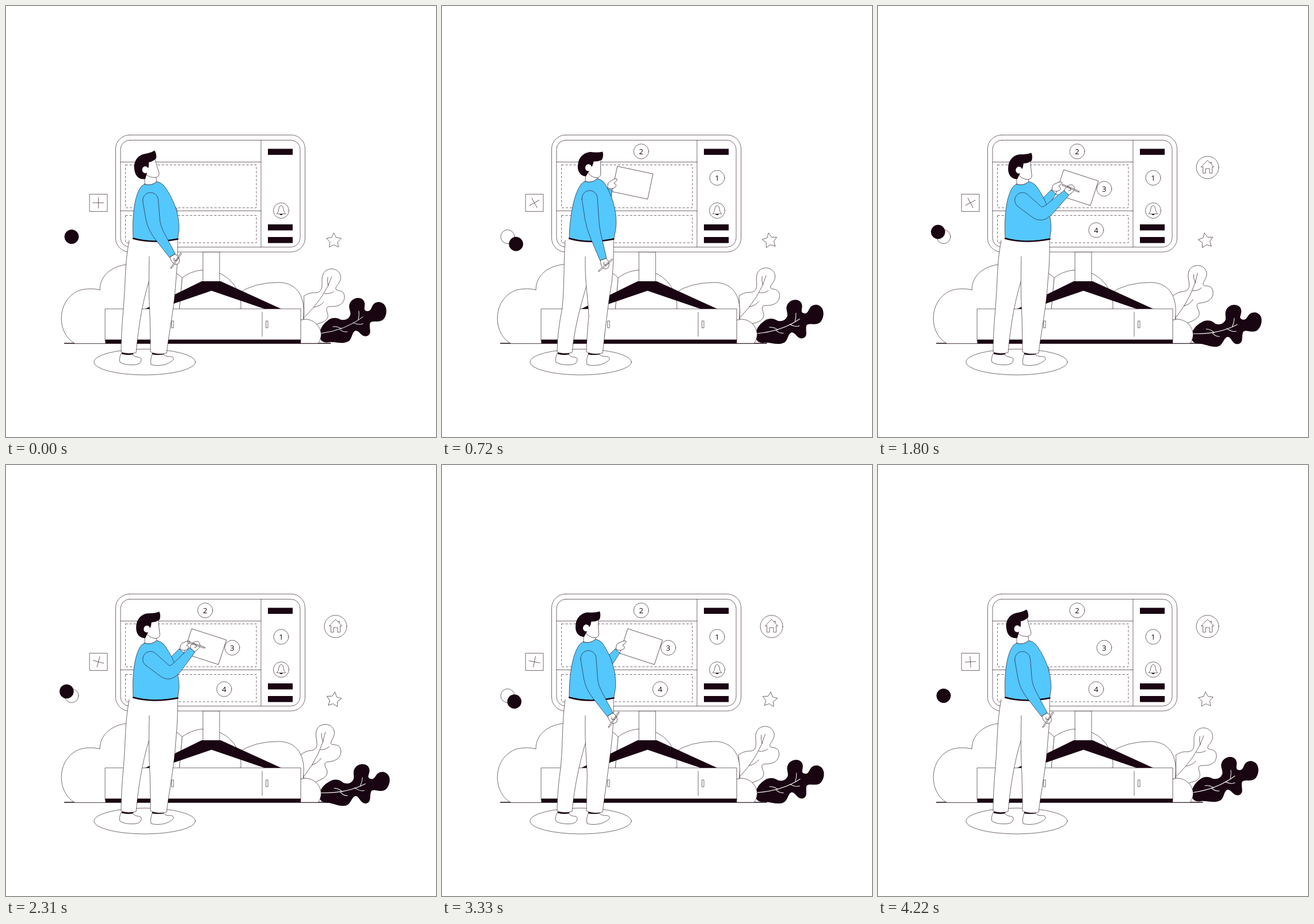
These frames come from a looping animation (747 by 750 pixels, 4260 ms). An HTML page:

```html
<!DOCTYPE html>
<html lang="en">
<head>
<meta charset="utf-8">
<title>Planning board</title>
<style>
  html, body { margin: 0; width: 100%; height: 100%; overflow: hidden; background: #fff }
  svg { display: block; width: 747px; height: 750px }
  svg { fill: #fff; stroke: #190411; stroke-width: .6; stroke-linejoin: round; stroke-linecap: round }
  .ink { fill: #190411; stroke: none }
  .blue { fill: #54c7fc }
  .line { fill: none }
  .dash { fill: none; stroke-dasharray: 4 3; stroke-linecap: butt }
  text { font: 13px "Open Sans", "Noto Sans", sans-serif; text-anchor: middle; fill: #190411; stroke: none }
</style>
</head>
<body>
<svg viewBox="0 0 747 750">
  <!-- plants -->
  <g id="paleLeaf">
    <path d="M518 504Q528 498 537 499C549 499 549 490 549 481C548 466 554 457 567 457.500C580 459 584 471 580 479C577 486 570 490 574 494C580 496 588 495 588 507C587 520 576 523 566 523C556 522 556 526 558 533C562 543 556 549 545 552L518 560Z"/>
    <path class="line" d="M519 541Q553 508 566 471M560 487Q557 480 559 472M553 500Q562 502 569 497M535 524Q545 523 552 515"/>
  </g>
  <path d="M101.500 587H564" stroke-width="1.300"/>
  <g id="darkLeaf">
    <path class="ink" d="M545 572C545 560 552 552 562 545Q572 540 582 546Q594 548 598 538C600 532 594 526 597 518C602 506 618 505 622 514C626 522 618 530 628 531C638 531 632 516 648 515C664 517 663 537 656 545C648 553 634 545 632 553C631 562 636 570 628 574C618 578 614 564 607 565C600 568 602 580 594 584C584 589 572 584 562 585C554 586 545 586 545 572Z"/>
    <path class="line" stroke="#fff" stroke-width="1" d="M546 570Q590 564 620 541M612 546Q614 538 613 531M603 551Q613 556 620 553M583 562Q577 557 568 558M580 563Q586 568 593 567"/>
  </g>
  <path d="M512 546C532 541 547 556 547.500 572Q547 581 542 587H512Z"/>
  <path d="M404 500Q430 481 475 481C505 482 522 505 516 546L404 550Z"/>
  <path d="M306 473A63 63 0 0 1 408 527L300 540Z"/>
  <path d="M163 494C163 460 200 443 240 451Q290 455 306 473L300 540H163Z"/>
  <path d="M119 587C86 568 88 508 130 494Q148 490 163 494L180 500V587Z" stroke="none"/>
  <path class="line" d="M119 587C86 568 88 508 130 494Q148 490 163 494"/>

  <!-- cabinet and stand -->
  <rect x="172.500" y="527" width="339.500" height="56"/>
  <path class="ink" d="M172.500 580.500H512V587H172.500Z"/>
  <path class="line" d="M282.500 533V575M445 533V575"/>
  <path d="M288 548h3v12h-3zM452 548h3v12h-3z"/>
  <path d="M342.500 428H371V480H342.500Z"/>
  <path class="ink" d="M340 479H373L478 527H449L357 495.500L265 527H242Z"/>

  <!-- screen -->
  <rect x="190.500" y="224.500" width="329" height="203.500" rx="24"/>
  <rect x="199" y="233.500" width="312" height="186" rx="16"/>
  <path class="line" d="M443 233.500V419.500M199 271.500H443M199 356.500H443"/>
  <path class="dash" d="M207.500 276.500H435V351H207.500ZM207.500 364.500H435V412H207.500Z"/>
  <path class="ink" d="M455 248.500h43v10.500h-43zM455 380h43v10.500h-43zM455 402h43v10.500h-43z"/>
  <circle cx="478" cy="356" r="13.500"/>
  <path d="M470.500 361.500Q474 358 474 353Q474 348 478 347Q482 348 482 353Q482 358 485.500 361.500Z"/>
  <path class="ink" d="M475 362h6q-3 4-6 0"/>

  <!-- badges, in order of appearance -->
  <g class="pop" data-x="478" data-y="299"><circle r="13"/><text y="4.700">1</text></g>
  <g class="pop" data-x="346" data-y="253"><circle r="13"/><text y="4.700">2</text></g>
  <g class="pop" data-x="393" data-y="318"><circle r="13"/><text y="4.700">3</text></g>
  <g class="pop" data-x="572.500" data-y="281">
    <circle r="19.500"/>
    <path d="M-8 -1V10H-3.500V2H3.500V10H8V-1H11L7 -5V-9H5V-7L0 -12.500L-11 -1Z"/>
  </g>
  <g class="pop" data-x="379" data-y="390"><circle r="13"/><text y="4.700">4</text></g>

  <!-- ornaments -->
  <rect x="145.500" y="327.500" width="30.500" height="30"/>
  <path id="plus" class="line" d="M-9.500 0H9.500M0 -9.500V9.500"/>
  <circle cx="114" cy="401.500" r="12"/>
  <circle id="dot" class="ink" r="12.300"/>
  <path id="star"/>

  <!-- person -->
  <ellipse cx="241" cy="619.500" rx="88" ry="22.500"/>
  <g id="paper">
    <rect width="63" height="45"/>
    <path d="M-9 40Q-12 31 -6 27Q1 20 4 22Q4 26 0 30Q6 31 4 36Q-1 42 -9 40Z"/>
  </g>
  <path id="backArm" class="blue"/>
  <path d="M200 605Q196 613 198 620Q206 625 222 624.500Q236 624 235 614Q234 611 229 611Q223 611 219 605Z"/>
  <path d="M254 606Q250 616 252 624Q262 627 276 624Q292 618 291 613Q289 609 283 610Q277 610 273 606Z"/>
  <path class="line" stroke-width="2.500" d="M202 604.500Q211 607 220 605M255 605Q264 607 273 605"/>
  <path stroke="none" d="M214 408H298L294 480L252 505L211 470Z"/>
  <path id="legL"/>
  <path id="legR"/>
  <g id="torso">
    <path d="M241 294V310Q252 314 262 306L260 294"/>
    <path class="blue" d="M241 310Q252 314 262 305.500Q269 307 274 312C290 333 302 362 300.500 390L298.500 405Q255 414 221 404C219 372 222 330 235 314Q238 311 241 310Z"/>
    <path class="line" stroke-width="2.400" d="M221 404.500Q255 414 298.500 405.500"/>
  </g>
  <g id="head">
    <path d="M244 272L259 266Q262 279 266 291Q266 298 258 298.500Q250 299 244 294Z"/>
    <path class="ink" d="M258 251.500Q251 256 238 258C226 262 221 274 223 284C224 296 232 303 242 301L245 290L248 279L248 272Q255 271 261 265Q262 257 258 251.500Z"/>
    <ellipse cx="242" cy="285" rx="5.500" ry="6" stroke="none"/>
  </g>
  <path id="arm" class="blue"/>
  <g id="hand">
    <path d="M0 -5Q5 -9 11 -7Q18 -4 17 0Q16 6 10 6.500Q4 7 0 5Z"/>
    <path transform="translate(11 0) rotate(67)" d="M-16 -1H13L16 0L13 1H-16Z"/>
    <path class="line" d="M8 -7Q14 -2 8 2L5 0"/>
  </g>
</svg>
<script>
const LOOP = 4260, TURN = 2 * Math.PI, RAD = Math.PI / 180;
const $ = id => document.getElementById(id);
const set = (id, name, value) => $(id).setAttribute(name, value);
const move = (id, [x, y], turn = 0) =>
  set(id, 'transform', `translate(${x} ${y}) rotate(${turn})`);

const lerp = (a, b, k) => a + (b - a) * k;
const mix = (a, b, k) => a.map((v, i) => lerp(v, b[i], k));
const polar = ([x, y], a, r) => [x + r * Math.cos(a), y + r * Math.sin(a)];
const side = (p, a, r) => polar(p, a + Math.PI / 2, r);
const heading = (p, q) => Math.atan2(q[1] - p[1], q[0] - p[0]);

const clamp = k => Math.min(1, Math.max(0, k));
function ease(t, from, to) {
  const k = clamp((t - from) / (to - from));
  return k * k * (3 - 2 * k);
}
// Rises from a to b, rests, falls from c to d.
const hold = (t, a, b, c, d) => ease(t, a, b) - ease(t, c, d);
const peak = (t, a, b, c) => hold(t, a, b, b, c);

const corners = Array.from({ length: 10 }, (_, i) => polar([0, 0], (i * 36 - 90) * RAD, i % 2 ? 7 : 13.5));
set('star', 'd', `M${corners.join('L')}Z`);
const pops = [...document.querySelectorAll('.pop')];

function drawArm(S, E, W, bend) {
  const a = heading(S, E), mid = (a + bend) / 2, miter = 11 / Math.cos((bend - a) / 2);
  const edge = s => [
    side(S, a, 13.5 * s), side(mix(S, E, .7), a, 12 * s), side(E, mid, miter * s),
    side(mix(E, W, .3), bend, 9.5 * s), side(W, bend, 6 * s)
  ];
  const p = edge(1), q = edge(-1);
  set('arm', 'd', `M${p[0]}L${p[1]}Q${p[2]} ${p[3]}L${p[4]}L${q[4]}L${q[3]}Q${q[2]} ${q[1]}L${q[0]}A13.5 13.5 0 0 0 ${p[0]}Z`);
}

function drawLegs(k) {
  set('legL', 'd', `M214 408C${206 + k} 450 ${208 + k} 480 ${204 + k} 525Q200 570 200 602Q212 607 226 603C230 560 ${236 + k} 520 ${248 + k} 480`);
  set('legR', 'd', `M249 436C248 480 ${248 + k} 500 ${250 + k} 540Q251 580 251 602Q264 608 279 604C283 570 ${293 - k} 520 295 480Q299 440 298 407`);
}

function drawPaper(t) {
  const shown = hold(t, 200, 700, 3400, 3950), lifted = hold(t, 720, 1260, 3400, 3950);
  const corner = mix([234, 352], mix([305, 279], [323, 285], lifted), shown);
  const turn = lerp(0, 12 + 6 * lifted, shown), a = turn * RAD;
  move('paper', corner, turn);

  const palm = side(polar(corner, a, -3), a, 33);
  const elbow = [282, 350], cuff = [palm[0] - 5, palm[1] + 8], arm = heading(elbow, cuff);
  set('backArm', 'd', `M${side(elbow, arm, 10)}L${side(cuff, arm, 5.5)}L${side(cuff, arm, -5.5)}L${side(elbow, arm, -8)}Z`);
}

function drawPerson(t) {
  const reach = peak(t, 0, 720, 1260), rest = peak(t, 2790, 3330, 4100);
  const lean = reach + .6 * rest;
  const rise = reach + .8 * peak(t, 2250, 2790, 4000);
  const raised = hold(t, 720, 1260, 2790, 3330);
  const attentive = hold(t, 0, 600, 3330, 4000);

  const dx = 8 * lean, dy = -5 * rise, sx = dx / 97, sy = dy / 97;
  set('torso', 'transform', `matrix(1 0 ${-sx} ${1 - sy} ${405 * sx} ${405 * sy})`);
  set('head', 'transform', `translate(${dx} ${dy}) rotate(${10 * attentive + 6 * lean} 240 301)`);
  drawLegs(-dy);

  const angle = lerp(57 + 15 * reach, -44 - 9 * ease(t, 1800, 2790), raised);
  const elbow = mix([257 + 5 * lean, 385], [285, 366 + dy], raised);
  const wrist = polar(elbow, angle * RAD, 59);
  drawArm([251 + 67 * sx, 338 + 67 * sy], elbow, wrist, angle * RAD);
  move('hand', wrist, angle);
  drawPaper(t);
}

function drawPops(t) {
  pops.forEach((pop, i) => {
    const k = clamp((t - 245 - 240 * i) / 240) - 1;
    const size = Math.max(0, 1 + 2.7 * k ** 3 + 1.7 * k ** 2);
    pop.setAttribute('transform', `translate(${pop.dataset.x} ${pop.dataset.y}) scale(${size})`);
    pop.setAttribute('visibility', size > .01 ? 'visible' : 'hidden');
  });
}

function draw(t) {
  const u = t / LOOP, sway = (1 - Math.cos(TURN * u)) / 2;
  set('darkLeaf', 'transform', `rotate(${10.4 * sway} 545 572)`);
  set('paleLeaf', 'transform', `rotate(${-8.5 * sway} 518 545)`);

  const drift = peak(t, 0, 660, 1290) - .85 * peak(t, 1290, 2040, 2760) + .9 * peak(t, 2760, 3500, 4220);
  move('dot', [114 + 15 * drift, 401.5 + 13 * drift]);
  move('plus', [160.5, 342.5], 360 * u);
  move('star', [569.5, 408.5], 10 * Math.sin(4 * TURN * u));
  drawPops(t);
  drawPerson(t);
}

const begin = performance.now();
function tick() {
  draw((performance.now() - begin) % LOOP);
  requestAnimationFrame(tick);
}
tick();
</script>
</body>
</html>
```
